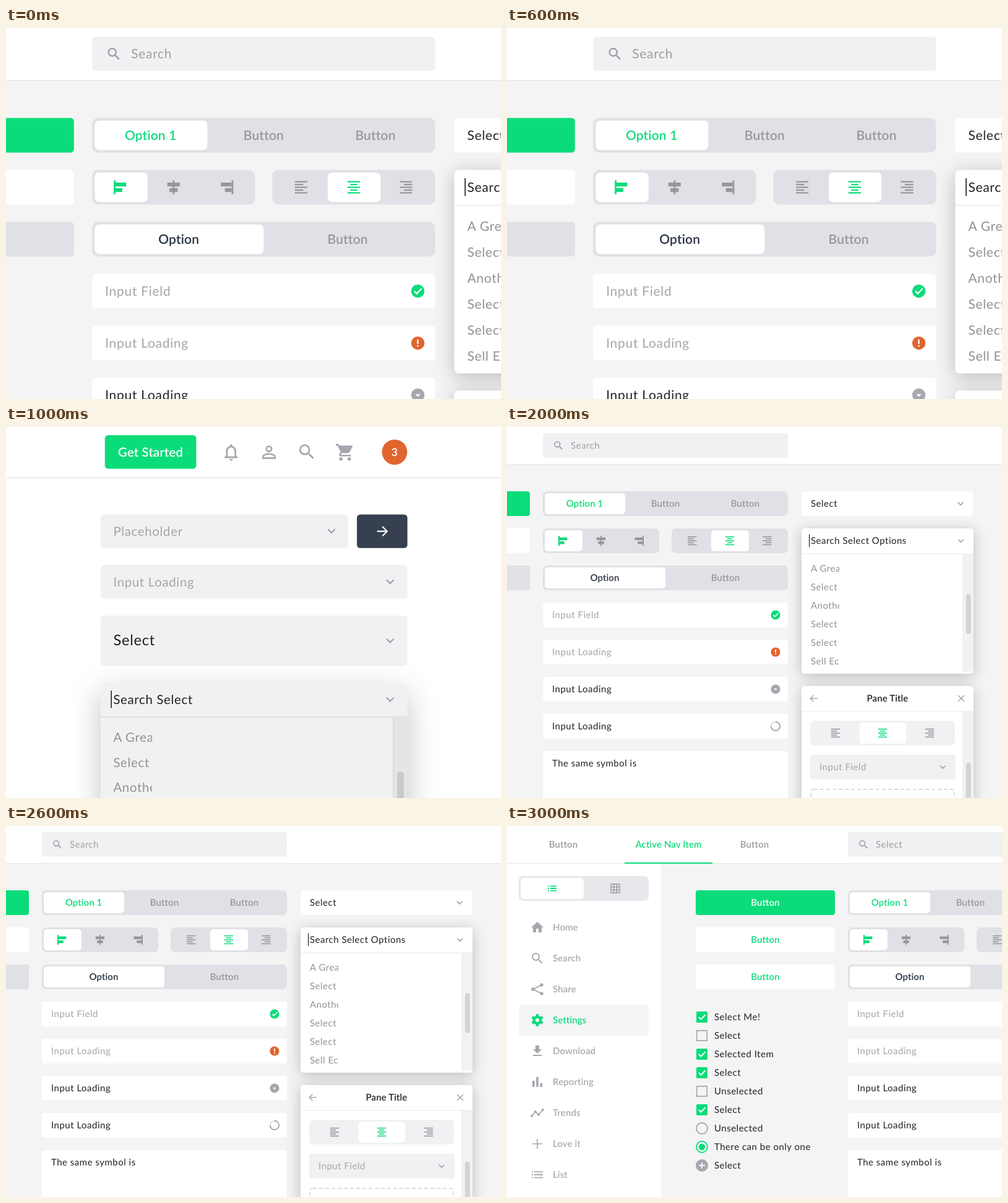
An HTML page that plays this animation: 800 by 600 pixels, repeating every 4000 ms.

```html
<!DOCTYPE html>
<html lang="en">
<head>
<meta charset="utf-8">
<title>UI kit tour</title>
<style>
html, body { margin: 0; width: 100%; height: 100%; overflow: hidden; background: #fff; }
#stage { display: block; width: 800px; height: 600px; }
text { font: 400 15px Lato, "Open Sans", sans-serif; letter-spacing: .5px; text-rendering: geometricPrecision; }
text.b { font-weight: 600; letter-spacing: .1px; }
.near { filter: drop-shadow(0 4px 11px rgba(0, 0, 0, .23)); }
.far { filter: drop-shadow(0 12px 18px rgba(0, 0, 0, .23)); }
</style>
</head>
<body>
<svg id="stage" viewBox="0 0 800 600"></svg>
<script>
const GREEN = '#0bdc7a', GREY = '#a6a6a6', ICON = '#a4a7ae', INK = '#222', NAVY = '#273142',
      SEG = '#e0e1e6', PALE = '#f0f1f3', ORANGE = '#e0652f', MID = '#96979c';

const rect = (x, y, w, h, fill, r = 4) =>
  `<rect x="${x}" y="${y}" width="${w}" height="${h}" rx="${r}" fill="${fill}"/>`;
const text = (x, y, s, fill = INK, extra = '') =>
  `<text x="${x}" y="${y + 5.2}" fill="${fill}" ${extra}>${s}</text>`;
const bold = (x, y, s, fill, anchor = 'middle') =>
  text(x, y, s, fill, `class="b" text-anchor="${anchor}"`);
const circle = (x, y, r, fill, extra = '') =>
  `<circle cx="${x}" cy="${y}" r="${r}" fill="${fill}" ${extra}/>`;
const line = (x, y, d, color, w = 1.6, extra = '') =>
  `<path transform="translate(${x} ${y})" d="${d}" fill="none" stroke="${color}" stroke-width="${w}" ${extra}/>`;
const group = (t, body) => `<g transform="${t}">${body}</g>`;

// 24-unit glyphs, placed by their centre
const glyphs = {
  search: 'M15.5 14h-.79l-.28-.27A6.47 6.47 0 0 0 16 9.5 6.5 6.5 0 1 0 9.5 16c1.61 0 3.09-.59 4.23-1.57l.27.28v.79l5 4.99L20.49 19zm-6 0a4.5 4.5 0 1 1 0-9 4.5 4.5 0 0 1 0 9z',
  home: 'M10 20v-6h4v6h5v-8h3L12 3 2 12h3v8z',
  download: 'M19 9h-4V3H9v6H5l7 7 7-7zM5 18v2h14v-2H5z',
  bars: 'M4 10h3.6v10H4zM10.2 4h3.6v16h-3.6zM16.4 14H20v6h-3.6z',
  bell: 'M12 22c1.1 0 2-.9 2-2h-4c0 1.1.9 2 2 2zm6-6v-5c0-3.07-1.63-5.64-4.5-6.32V4a1.5 1.5 0 0 0-3 0v.68C7.64 5.36 6 7.92 6 11v5l-2 2v1h16v-1l-2-2zm-2 1H8v-6c0-2.48 1.51-4.5 4-4.5s4 2.02 4 4.5v6z',
  person: 'M12 5.9a2.1 2.1 0 1 1 0 4.2 2.1 2.1 0 0 1 0-4.2m0 9c2.97 0 6.1 1.46 6.1 2.1v1.1H5.9V17c0-.64 3.13-2.1 6.1-2.1M12 4a4 4 0 1 0 0 8 4 4 0 0 0 0-8zm0 9c-2.67 0-8 1.34-8 4v3h16v-3c0-2.66-5.33-4-8-4z',
  cart: 'M7 18a2 2 0 1 0 0 4 2 2 0 0 0 0-4zM1 2v2h2l3.6 7.59-1.35 2.45C4.52 15.37 5.48 17 7 17h12v-2H7.42a.25.25 0 0 1-.22-.37l.9-1.63h7.45c.75 0 1.41-.41 1.75-1.03l3.58-6.49A1 1 0 0 0 20 4H5.21l-.94-2H1zm16 16a2 2 0 1 0 0 4 2 2 0 0 0 0-4z'
};
const icon = (name, x, y, color = ICON, size = 24) =>
  `<path transform="translate(${x} ${y}) scale(${size / 24}) translate(-12 -12)" d="${glyphs[name]}" fill="${color}" fill-rule="evenodd"/>`;

const chevron = (x, y) => line(x, y, 'M-4.3-2.2 0 2.1 4.3-2.2', '#9a9da4', 1.5);
const tick = (x, y, s = 1) => line(x, y, `M${-5 * s} 0 ${-1.5 * s} ${3.6 * s} ${5.5 * s} ${-3.8 * s}`, '#fff', 2 * s);
const listIcon = (x, y, w, gap, color) => [-gap, 0, gap].map(d =>
  line(x, y + d, `M${-w / 2} 0h2M${-w / 2 + 4} 0H${w / 2}`, color, 1.8)).join('');

// side: -1 left, 0 centre, 1 right
const alignText = (x, y, side, color = MID) => [0, 1, 2, 3, 4].map(i => {
  const w = i % 2 ? (side ? (side > 0 ? 9.6 : 9.6) : 8) : 14.4;
  return rect(x + side * (7.2 - w / 2) - w / 2, y - 7.2 + i * 3.2, w, 1.6, color, 0);
}).join('');
const alignBox = (x, y, side, color = MID) => {
  const bar = (w, dy) => rect(side ? x + side * (4.9 - (w - 12.4) / 2 - 4) - w / 2 - side * .1 : x - w / 2, y + dy, w, 4.4, color, 0);
  return rect(x + side * 8 - 1, y - 8, 2, 16, color, 0) + bar(side ? 12.4 : 14.3, -5.4) + bar(side ? 7.8 : 9.4, 1);
};

const segment = (x, y, w, onX, onW, fill = SEG) =>
  rect(x, y, w, 40, fill, 7) + rect(onX, y + 3, onW, 34, '#fff', 5);

const scrollPanel = (x, y, w, h, fill, thumbY, shade) =>
  `<g class="${shade}">${rect(x, y, w, h, fill, 5)}</g>` +
  rect(x, y + 40.4, w, 1, 'rgba(0,0,0,.09)', 0) +
  rect(x + w - 17, y + 41.4, 17, h - 45, 'rgba(0,0,0,.05)', 0) +
  rect(x + w - 17.4, y + 41.4, 1, h - 42, 'rgba(0,0,0,.07)', 0) +
  rect(x + w - 12.2, y + thumbY, 8, 65, 'rgba(0,0,0,.12)', 4);

const dropdown = (x, y, w, h, label, fill, shade) =>
  scrollPanel(x, y, w, h, fill, 106, shade) +
  text(x + 15, y + 20, label) + chevron(x + w - 20.5, y + 20) +
  rect(x + 12, y + 9.5, 1.2, 20.5, INK, 0) +
  `<svg x="${x + 15}" y="${y + 45}" width="46" height="190">` +
  ['A Great', 'Select', 'Another', 'Select', 'Select', 'Sell Eco']
    .map((s, i) => text(0, 20 + i * 30, s, '#929292')).join('') + '</svg>';

const field = (y, s, color, h = 40) => rect(58, y, 396, h, '#fff') + text(73, y + 20, s, color);

function sidebar() {
  const names = ['Home', 'Search', 'Share', 'Settings', 'Download', 'Reporting', 'Trends', 'Love it', 'List'];
  const nodes = (pts, r) => pts.map(([x, y]) => circle(x, y, r, ICON)).join('');
  return rect(0, 61, 249, 560, '#fff', 0) +
    bold(91, 30, 'Button', '#9b9ca1') + bold(261, 30, 'Active Nav Item', GREEN) + bold(400, 30, 'Button', '#9b9ca1') +
    rect(190, 59, 142, 2, GREEN, 0) +
    segment(19, 81, 210, 22, 102, '#e6e8eb') + listIcon(73, 101, 14, 3.6, GREEN) +
    line(175, 101, 'M-7-7H7V7H-7zM-7-2.3H7M-7 2.3H7M-2.3-7V7M2.3-7V7', MID, 1.3) +
    rect(19, 289, 210, 50, '#f4f5f7') +
    names.map((s, i) => bold(74, 164 + i * 50, s, i === 3 ? GREEN : '#a9aaaf', 'start')).join('') +
    icon('home', 49, 164) + icon('search', 49, 214) +
    line(49, 264, 'M7-7-7 0 7 7', ICON, 1.8) + nodes([[56, 257], [42, 264], [56, 271]], 2.7) +
    circle(49, 314, 5.3, 'none', `stroke="${GREEN}" stroke-width="4.4"`) +
    circle(49, 314, 8.2, 'none', `stroke="${GREEN}" stroke-width="3.4" pathLength="6" stroke-dasharray=".5 .5" stroke-dashoffset="-.25"`) +
    icon('download', 49, 364) + icon('bars', 49, 414) +
    line(49, 464, 'M-9 5-3-2 2 3 9-5', ICON, 1.8) + nodes([[40, 469], [46, 462], [51, 467], [58, 459]], 1.9) +
    line(49, 514, 'M-8 0H8M0-8V8', ICON, 1.7) + listIcon(49, 564, 18, 4.6, ICON);
}

function choices() {
  const rows = [['Select Me!', 1], ['Select', 0], ['Selected Item', 1], ['Select', 1], ['Unselected', 0],
    ['Select', 1], ['Unselected', 2], ['There can be only one', 3], ['Select', 4]];
  const ring = color => `stroke="${color}" stroke-width="1.8"`;
  const marks = [
    y => line(315, y, 'M-8.2-8.2H8.2V8.2H-8.2z', ICON, 1.7),
    y => rect(306, y - 9, 18, 18, GREEN, 1.5) + tick(315, y),
    y => circle(315, y, 9, 'none', ring(ICON)),
    y => circle(315, y, 9, 'none', ring(GREEN)) + circle(315, y, 5.2, GREEN),
    y => circle(315, y, 10, ICON) + line(315, y, 'M-5 0H5M0-5V5', '#fff', 2)
  ];
  return rows.map(([s, kind], i) => marks[kind](309 + i * 30) + text(335, 309 + i * 30, s)).join('');
}

function pane() {
  return scrollPanel(476, 419, 278, 300, '#fff', 124, 'near') +
    line(496, 439, 'M6 0H-5.5M-.5-5.3-5.8 0-.5 5.3', ICON, 1.5) +
    bold(615, 439, 'Pane Title', INK) + line(734, 439, 'M-5-5 5 5M5-5-5 5', ICON, 1.5) +
    segment(490, 475, 234, 569.5, 75.5, PALE) +
    alignText(531, 495, -1) + alignText(607, 495, 0, GREEN) + alignText(683, 495, 1) +
    rect(490, 530, 235, 40, PALE) + text(505, 550, 'Input Field', GREY) + chevron(704, 550) +
    `<rect x="491" y="586" width="232" height="60" rx="5" fill="none" stroke="#dcdde0" stroke-width="2" stroke-dasharray="6 4"/>`;
}

function board(query, third) {
  const left = (y, fill, color) => rect(305, y, 225, 40, fill) + bold(417.5, 124 + y - 104, 'Button', color);
  return rect(-493, 0, 1400, 700, '#f4f4f4', 0) + rect(-493, 0, 1400, 60, '#fff', 0) +
    rect(-493, 60, 1400, 1, '#e5e5e6', 0) +
    group('translate(-493)', sidebar() + left(104, GREEN, '#fff') + left(164, '#fff', GREEN) + left(224, third, GREEN) + choices()) +
    rect(58, 10, 396, 39.5, PALE) + icon('search', 83.2, 30, '#9b9ca1', 19) + text(103, 30, query, '#9f9fa2') +
    segment(58, 104, 396, 61, 130) + bold(125.5, 124, 'Option 1', GREEN) +
    bold(256, 124, 'Button', MID) + bold(385, 124, 'Button', MID) +
    segment(58, 164, 188, 61, 61) + alignBox(92, 184, -1, GREEN) + alignBox(152, 184, 0) + alignBox(212, 184, 1) +
    segment(266, 164, 188, 330, 61) + alignText(299.3, 184, -1) + alignText(360, 184, 0, GREEN) + alignText(420.3, 184, 1) +
    segment(58, 224, 396, 61, 195) + bold(158, 244, 'Option', NAVY) + bold(353, 244, 'Button', MID) +
    field(284, 'Input Field', GREY) + circle(434, 304, 7.6, GREEN) + tick(434, 304, .8) +
    field(344, 'Input Loading', GREY) + circle(434, 364, 7.6, ORANGE) +
    line(434, 364, 'M0-4.2V1M0 2.4V4.2', '#fff', 1.7) +
    field(404, 'Input Loading') + circle(434, 424, 7.6, '#a5a8af') + '<path d="M431 423h6l-3 3z" fill="#fff"/>' +
    field(464, 'Input Loading') + circle(434, 484, 7.2, 'none', 'stroke="#d3d4d8" stroke-width="1.5"') +
    line(434, 484, 'M0-7.2A7.2 7.2 0 1 1-7.2 0', '#96989e', 1.5) +
    field(524, 'The same symbol is', INK, 100) +
    rect(476, 104, 277, 40, '#fff') + text(491, 124, 'Select') + chevron(733, 124) +
    dropdown(476, 164, 278, 235, 'Search Select Options', '#fff', 'near') + pane();
}

function form() {
  return rect(-120, 0, 620, 460, '#fff', 0) + rect(-120, 60, 620, 1, '#e5e5e6', 0) +
    rect(5, 9.7, 108.6, 40, GREEN) + bold(59.3, 30, 'Get Started', '#fff') +
    icon('bell', 155, 30) + icon('person', 200, 30) + icon('search', 245, 29.5) + icon('cart', 290.4, 30) +
    circle(349.3, 29.8, 15, ORANGE) +
    text(349.3, 29.2, '3', '#fff', 'class="b" text-anchor="middle" style="font-size:13px"') +
    rect(0, 104, 294, 40, PALE) + text(15, 124, 'Placeholder', GREY) + chevron(274.3, 123.7) +
    rect(304.5, 104, 60, 40, '#364050') + line(334.5, 124, 'M-6 0H5.6M.3-5.6 5.9 0 .3 5.6', '#fff', 1.5) +
    rect(0, 164, 364.5, 40, PALE) + text(15, 184.3, 'Input Loading', GREY) + chevron(344, 184) +
    rect(0, 224.3, 364.5, 59.7, PALE) + text(15, 254.6, 'Select', INK, 'style="font-size:17.5px"') + chevron(344, 254) +
    dropdown(0, 304, 364.5, 235, 'Search Select', PALE, 'far');
}

const stage = document.getElementById('stage');
stage.innerHTML =
  group('translate(58) scale(1.4)', board('Search', SEG)) +
  group('translate(153) scale(1.36)', form()) +
  group('', board('Search', SEG)) +
  group('translate(493)', board('Select', '#fff'));

const scenes = [...stage.children];
function tickFrame() {
  const now = Math.floor(performance.now() / 1000) % scenes.length;
  scenes.forEach((g, i) => g.style.display = i === now ? '' : 'none');
  requestAnimationFrame(tickFrame);
}
tickFrame();
</script>
</body>
</html>
```
